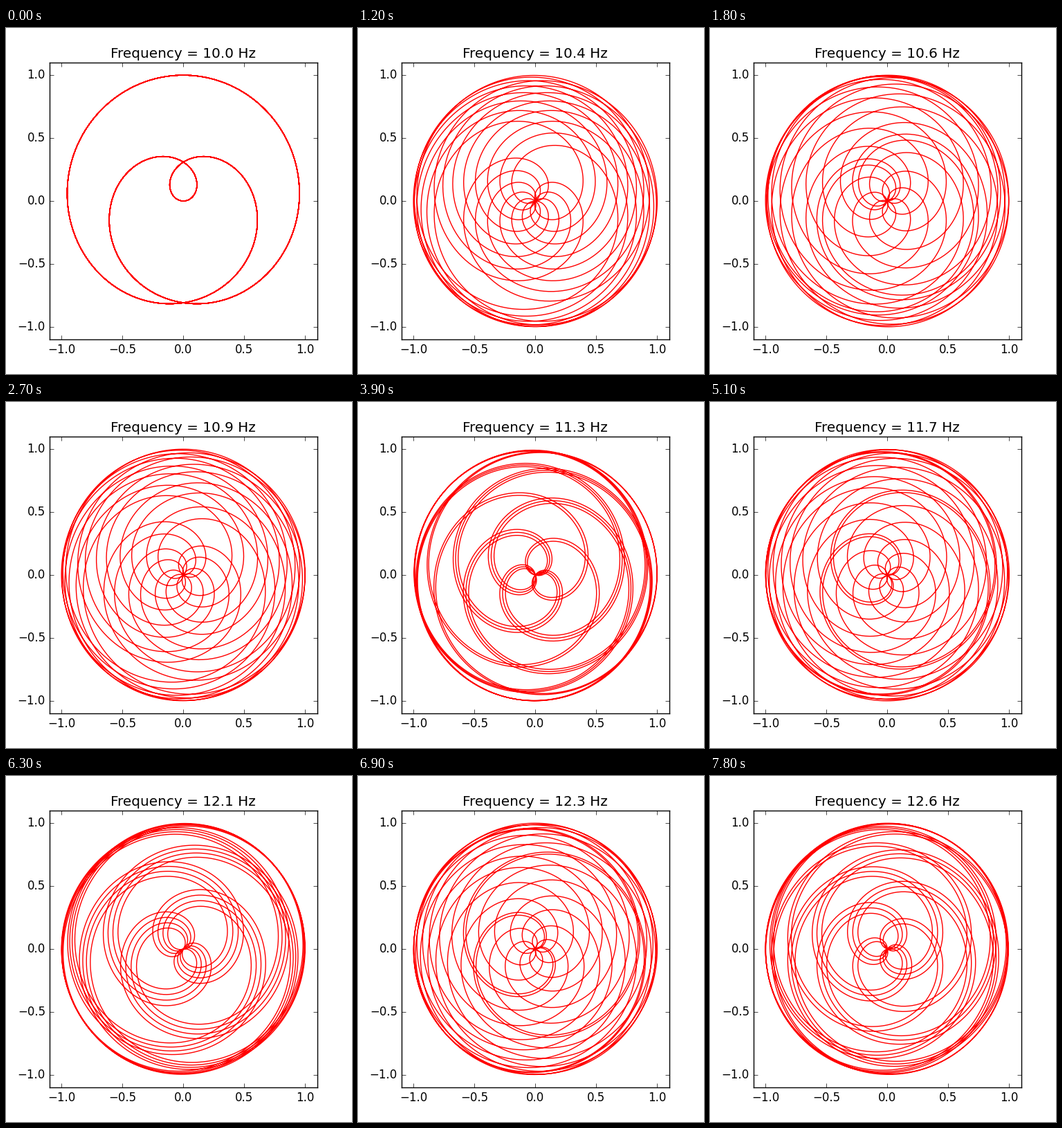
Write a matplotlib script that moves like this. It is 500 by 500 pixels and loops after 8 s.

```python
import numpy as np
import matplotlib.pyplot as plt
from matplotlib.animation import FuncAnimation

plt.style.use("classic")

SIGNAL_HZ = 2.0
START_HZ = 10.0
STEP_HZ = 0.1
INTERVAL = 100        # ms per animation frame
FRAMES = 80
FRAMES_PER_STEP = 3   # the winding frequency changes every 300 ms

t = np.linspace(0, 2, 5001)
signal = np.sin(2 * np.pi * SIGNAL_HZ * t)

fig = plt.figure(figsize=(5, 5), dpi=100, facecolor="white")
ax = fig.add_axes([0.125, 0.1, 0.775, 0.8])
ax.set_xlim(-1.1, 1.1)
ax.set_ylim(-1.1, 1.1)
ticks = np.arange(-1, 1.01, 0.5)
ax.set_xticks(ticks)
ax.set_yticks(ticks)
curve, = ax.plot([], [], color="red", lw=1)
title = ax.set_title("")


def update(frame):
    freq = START_HZ + STEP_HZ * (frame // FRAMES_PER_STEP)
    angle = 2 * np.pi * freq * t
    curve.set_data(signal * np.cos(angle), signal * np.sin(angle))
    title.set_text(f"Frequency = {freq:.1f} Hz")
    return curve, title


anim = FuncAnimation(fig, update, frames=FRAMES, interval=INTERVAL,
                     repeat=True, repeat_delay=0, blit=False)
plt.show()
```
